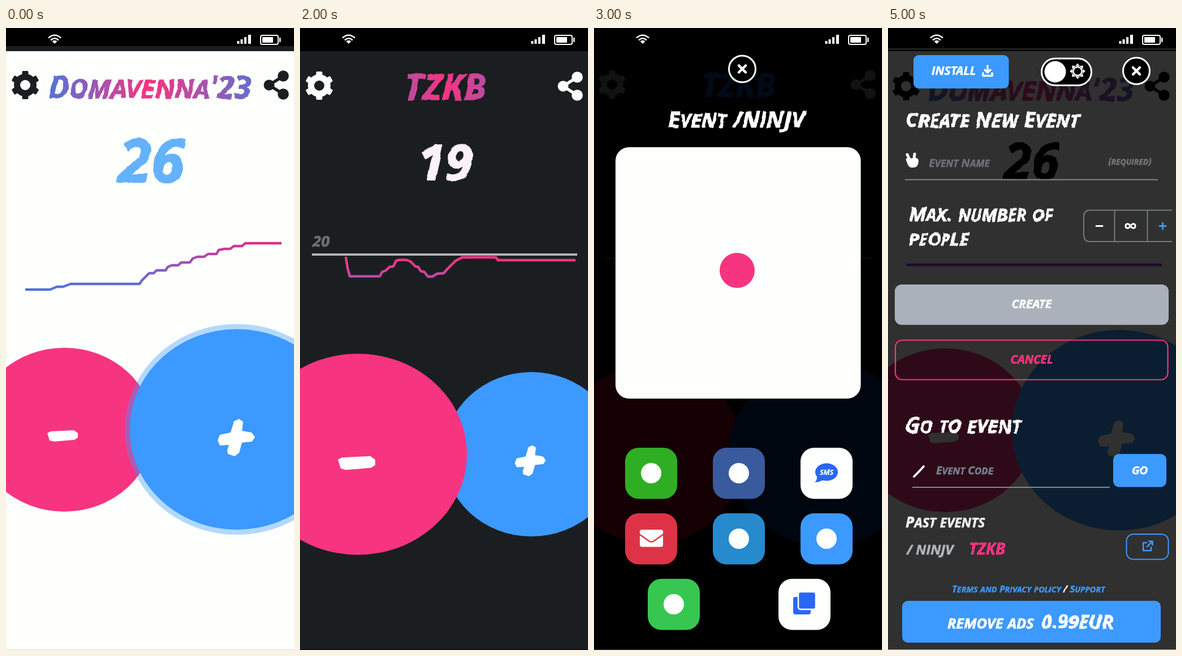
Animation, 509 px wide and 1101 px high, one loop 6 s. Source, as an HTML page:

```html
<!DOCTYPE html>
<html lang="en">
<head>
<meta charset="utf-8">
<title>People counter</title>
<style>
html, body { margin: 0; width: 100%; height: 100%; overflow: hidden; background: #000; }
svg { display: block; width: 100%; height: 100%; }
text { font: italic 700 20px "Open Sans", "Noto Sans", sans-serif; white-space: pre; stroke-linejoin: round; }
</style>
</head>
<body>
<svg id="stage" viewBox="0 0 509 1101" preserveAspectRatio="none"></svg>
<script>
const PINK = '#f73480', BLUE = '#3c99ff', DARK = '#1b1e20', PAPER = '#fdfffd';
const EVENT = "Domavenna'23", BAND = 'TZKB';

// Marker lettering: lower case becomes slightly smaller capitals.
function text(x, y, size, str, fill = '#fff', anchor = 'start') {
  const spans = str.replace(/[a-z]+/g, s =>
    `<tspan font-size="${size * 0.86}">${s.toUpperCase()}</tspan>`);
  return `<text x="${x}" y="${y}" style="font-size:${size}px" fill="${fill}" stroke="${fill}"
    stroke-width="${size * 0.025}" text-anchor="${anchor}" filter="url(#rough${size > 30 ? 'Big' : ''})">${spans}</text>`;
}
const mid = (x, y, size, str, fill) => text(x, y, size, str, fill, 'middle');

const rect = (x, y, w, h, fill, r = 0, extra = '') =>
  `<rect x="${x}" y="${y}" width="${w}" height="${h}" rx="${r}" fill="${fill}" ${extra}/>`;
const oval = (x, y, rx, ry, fill, extra = '') =>
  `<ellipse cx="${x}" cy="${y}" rx="${rx}" ry="${ry}" fill="${fill}" ${extra}/>`;
const disc = (x, y, r, fill, extra) => oval(x, y, r, r, fill, extra);
const pen = (d, color, w, cap = 'round') =>
  `<path d="${d}" fill="none" stroke="${color}" stroke-width="${w}" stroke-linecap="${cap}" stroke-linejoin="round"/>`;
const shape = (d, fill) => `<path d="${d}" fill="${fill}"/>`;
const at = (x, y, scale, body) => `<g transform="translate(${x} ${y}) scale(${scale})">${body}</g>`;
const edge = (color, w) => `stroke="${color}" stroke-width="${w}"`;
const ring = (n, body) => Array.from({ length: n }, (_, i) =>
  `<g transform="rotate(${i * 360 / n})">${body}</g>`).join('');

const gear = (x, y, color) => at(x, y, 1,
  disc(0, 0, 14.5, 'none', edge(color, 11)) + ring(6, rect(-5.5, -25, 11, 9, color, 2)));
const sun = (x, y) => at(x, y, 1,
  disc(0, 0, 7.5, 'none', edge('#fff', 2.5)) + ring(8, shape('M-4 -9L0 -14L4 -9Z', '#fff')));

const share = (x, y, color) => at(x, y, 1,
  pen('M12 -16L-13 0L12 16', color, 5.5) +
  disc(-13, 0, 9.5, color) + disc(12, -16, 9.8, color) + disc(12, 16, 9.8, color));

const minus = (x, y, scale = 1) => at(x, y, scale,
  shape('M-27 -5L-21 -8L20 -10L27 -5L27 3L21 7L-15 10L-23 8Z', '#fff'));
const plus = (x, y, scale = 1) => at(x, y, scale,
  shape('M-4 -29L5 -33L12 -28L10 -12L27 -9L33 -1L28 7L10 9L5 27L-3 33L-15 29L-16 22L-13 13L-29 14L-33 5L-29 -5L-10 -9Z', '#fff'));

const close = (x, y) => disc(x, y, 23.5, '#000', edge('#fff', 3)) +
  pen(`M${x - 6} ${y - 6}l12 12m0 -12l-12 12`, '#fff', 4.5);

const status = rect(408.5, 23, 4, 5, '#fff') + rect(414.5, 20, 4, 8, '#fff') +
  rect(421, 16, 4, 12, '#fff') + rect(428, 12, 5, 16, '#fff') +
  rect(450, 13, 31, 16, 'none', 3, edge('#fff', 2)) + rect(453, 16, 19, 10, '#fff', 1) +
  rect(483, 17, 2.5, 8, '#fff', 1) +
  pen('M75 17.5Q86 8 97 17.5M79 21.5Q86 15 93 21.5', '#fff', 2.6, 'butt') +
  shape('M81.5 23.5Q86 20 90.5 23.5L86 28Z', '#fff');

function counter() {
  const chart = 'M34 463H78L90 458H101L114 453H236L240 447L253 434H261L266 429H282L286 423L293 420H304' +
    'L310 415H325L330 408L338 405H350L357 400H372L376 393L386 391H396L403 386H417L423 381H487';
  return rect(0, 0, 509, 1101, PAPER) + rect(0, 0, 509, 41, DARK) + rect(0, 0, 509, 32, '#000') +
    gear(34, 101, DARK) + share(478, 101, DARK) +
    mid(254, 124, 53, EVENT, 'url(#title)') + mid(257, 273, 105, '26', '#64b2fb') +
    pen(chart, 'url(#rise)', 4.5, 'butt') +
    oval(103, 711, 158, 145, PINK) +
    oval(408, 710.5, 198, 186.5, BLUE, 'opacity=".38"') + oval(408, 710.5, 189.5, 177.5, BLUE) +
    minus(100, 722) + plus(407, 725) + rect(0, 1100, 509, 1, '#d8d8d8');
}

function settings() {
  const behind = rect(0, 0, 509, 1101, PAPER) + gear(32, 103, '#000') + share(476, 103, '#000') +
    mid(252, 128, 54, EVENT, 'url(#title)') + mid(254, 267, 88, '26', '#000') +
    oval(101, 712, 158, 145, PINK) + oval(408, 712, 189, 177.5, BLUE) +
    minus(98, 725) + plus(404, 727) + rect(0, 0, 509, 1101, '#000', 0, 'opacity=".81"');
  const top = rect(0, 0, 509, 41, '#000') + rect(0, 36.5, 509, 1.5, '#3a3b3a') +
    rect(45, 48, 168.5, 59, BLUE, 9) + mid(116, 83, 24.5, 'install') +
    pen('M176 67V78M171 74L176 79L181 74', '#fff', 3.4) +
    pen('M168 80V84.5H184V80', '#fff', 3.6) +
    rect(271.5, 54, 88, 47.5, '#000', 23.7, edge('#fff', 3)) + disc(295.5, 77.5, 19, '#fff') +
    sun(335, 76.5) + close(439, 76);
  const form = text(30, 176, 38, 'Create New Event') +
    pen('M38 233L34 224M46 232L47 223', '#fff', 5) +
    shape('M32 234Q31 230 35 231L50 230Q54 231 54 236Q53 247 46 247H41Q38 247 35 242Z', '#fff') +
    text(72, 246, 20, 'Event Name', '#6d7078') + text(389, 242, 16.2, '(required)', '#757877') +
    rect(30, 267.5, 447, 2, '#858685') +
    text(37, 342, 34.7, 'Max. number of') + text(37, 385, 35, 'people') +
    pen('M502 322.5H357Q346 322.5 346 334V366Q346 378 357 378H502M400.5 322V378M458.5 322V378', '#777a7c', 2, 'butt') +
    pen('M368 350.5H379', '#fff', 3) +
    pen('M428.5 350.5C425 345 420 346 420 350.5S425 356 428.5 350.5C432 345 437 346 437 350.5S432 356 428.5 350.5', '#fff', 3) +
    pen('M480 350.5H491M485.5 345V356', BLUE, 3) +
    rect(32, 417, 452, 4.5, '#1d0a2c') +
    rect(12, 454, 484, 71.5, '#aab1bb', 12) + mid(254, 496, 24.3, 'create') +
    rect(13, 552.5, 481.5, 70, 'none', 12, edge(PINK, 2.2)) + mid(254, 594, 23.8, 'cancel', PINK);
  const join = text(30, 717, 37.7, 'Go to event') + pen('M46 794Q56 784 63 776', '#fff', 3.8) +
    text(85, 790, 19.5, 'Event Code', '#79818e') + rect(43, 812, 349, 2, '#858685') +
    rect(398, 754, 94, 58.5, BLUE, 10) + mid(445, 790, 23.5, 'go') +
    text(31, 884, 26.5, 'Past events', '#f0f1f0') + text(33, 932, 24, '/ NINJV', '#b0b5bc') +
    text(143, 932, 28, BAND, PINK) +
    rect(421.5, 896, 74, 44.5, 'none', 12, edge(BLUE, 2)) +
    pen('M457 911H451V925H465V919M458 918L467 909M461 908.5H467.5V915', BLUE, 2.6) +
    text(113, 999, 16.7, 'Terms and Privacy policy / Support', BLUE)
      .replace(' / ', ' <tspan fill="#fff" stroke="#fff">/</tspan> ') +
    rect(25, 1014, 457, 74, BLUE, 10) + text(105, 1063, 29.5, 'remove ads') +
    text(272, 1063, 33.5, '0.99EUR') + rect(0, 1100, 509, 1, '#bbb');
  return behind + top + form + join;
}

function limited() {
  const chart = 'M81 405L84 425L88 439.5H141L145 432L152 429L158 423L165 422L170 412L175 410.5H188L195 413' +
    'L204 422L209 423L213 430L220 432L226 440H234L242 435L254 434L260 427L275 412L287 406H346L350 411H487';
  return rect(0, 0, 509, 1101, DARK) + rect(0, 0, 509, 41, '#000') +
    gear(34, 102, '#fff') + share(478, 103, '#fff') +
    mid(256, 127, 63, BAND, 'url(#title)') + mid(257, 269, 88, '19', '#fbf1f6') +
    text(22, 387, 27.5, '20', '#6f7070') +
    pen(chart, 'url(#fall)', 4.5, 'butt') + rect(21, 399, 469, 4, '#b0b4bb') +
    oval(409, 754.5, 155, 145.5, BLUE) + oval(102, 754.5, 193, 178, PINK) +
    minus(100, 770, 1.22) + plus(407, 766, 0.83) + rect(0, 1100, 509, 1, '#000');
}

function sharing() {
  const tile = (x, y, fill) => rect(x, y, 92, 90.5, fill, 24);
  // Brand buttons carry one plain dot.
  const brands = [[55, 743, '#30ae23'], [210, 743, '#3a5a9e'], [210, 859, '#268acd'],
    [365, 859, BLUE], [95, 975, '#37c751']]
    .map(([x, y, fill]) => tile(x, y, fill) + disc(x + 46, y + 45, 18, '#fff')).join('');
  const sms = tile(365, 743, PAPER) + oval(411, 786, 20, 15.5, '#2a66f5') +
    shape('M394 793Q395 800 390 804Q400 804 406 799Z', '#2a66f5') +
    mid(411, 791, 12.5, 'SMS');
  const mail = tile(55, 859, '#de3347') + rect(81, 888, 41, 30.5, '#fff', 4) +
    pen('M80 896L97 908Q101.5 911 106 908L123 896', '#de3347', 2.4);
  const copy = tile(326, 975, PAPER) + rect(352, 1007, 31, 31, '#2a66f5', 4) +
    rect(361, 998, 31, 31, '#2a66f5', 4, edge(PAPER, 2.5));
  return rect(0, 0, 509, 1101, '#000') + gear(32, 100, '#111312') + share(476, 100, '#111312') +
    mid(255, 122, 57, BAND, '#020a18') + rect(21, 405, 469, 4, '#100207') +
    oval(101, 755, 164, 158, '#150004') + oval(409, 755, 172, 162, '#00060f') +
    close(262, 72.5) + text(130, 176, 40, 'Event /NINJV') +
    rect(38, 211, 433.5, 445, PAPER, 24) + disc(253, 429, 31, PINK) +
    brands + sms + mail + copy + rect(0, 1099, 509, 2, '#1c1c1c');
}

const gradient = (id, from, to, stops) =>
  `<linearGradient id="${id}" gradientUnits="userSpaceOnUse" x1="${from[0]}" y1="${from[1]}" x2="${to[0]}" y2="${to[1]}">` +
  stops.map((c, i) => `<stop offset="${i / (stops.length - 1)}" stop-color="${c}"/>`).join('') + '</linearGradient>';
const rough = (id, freq, scale) =>
  `<filter id="${id}" x="-5%" y="-10%" width="110%" height="120%" color-interpolation-filters="sRGB">
    <feTurbulence type="fractalNoise" baseFrequency="${freq}" numOctaves="2" seed="4"/>
    <feDisplacementMap in="SourceGraphic" scale="${scale}" xChannelSelector="R" yChannelSelector="G"/></filter>`;

const stage = document.getElementById('stage');
stage.innerHTML = '<defs>' +
  gradient('title', [66, 0], [443, 0], ['#4a78dc', PINK, '#5c70d4']) +
  gradient('rise', [0, 463], [0, 381], ['#4f74dc', '#8d59bb', '#df3088']) +
  gradient('fall', [0, 412], [0, 442], [PINK, '#bf4aaa']) +
  rough('rough', 0.09, 2) + rough('roughBig', 0.05, 6) + '</defs>' +
  [counter, settings, limited, sharing].map(f => `<g class="scene">${f()}</g>`).join('') + status;

const scenes = [...stage.querySelectorAll('.scene')];
const order = [0, 1, 2, 3, 2, 1];
function draw() {
  const now = order[Math.floor(performance.now() / 1000) % order.length];
  scenes.forEach((s, i) => { s.style.display = i === now ? '' : 'none'; });
  requestAnimationFrame(draw);
}
draw();
</script>
</body>
</html>
```
